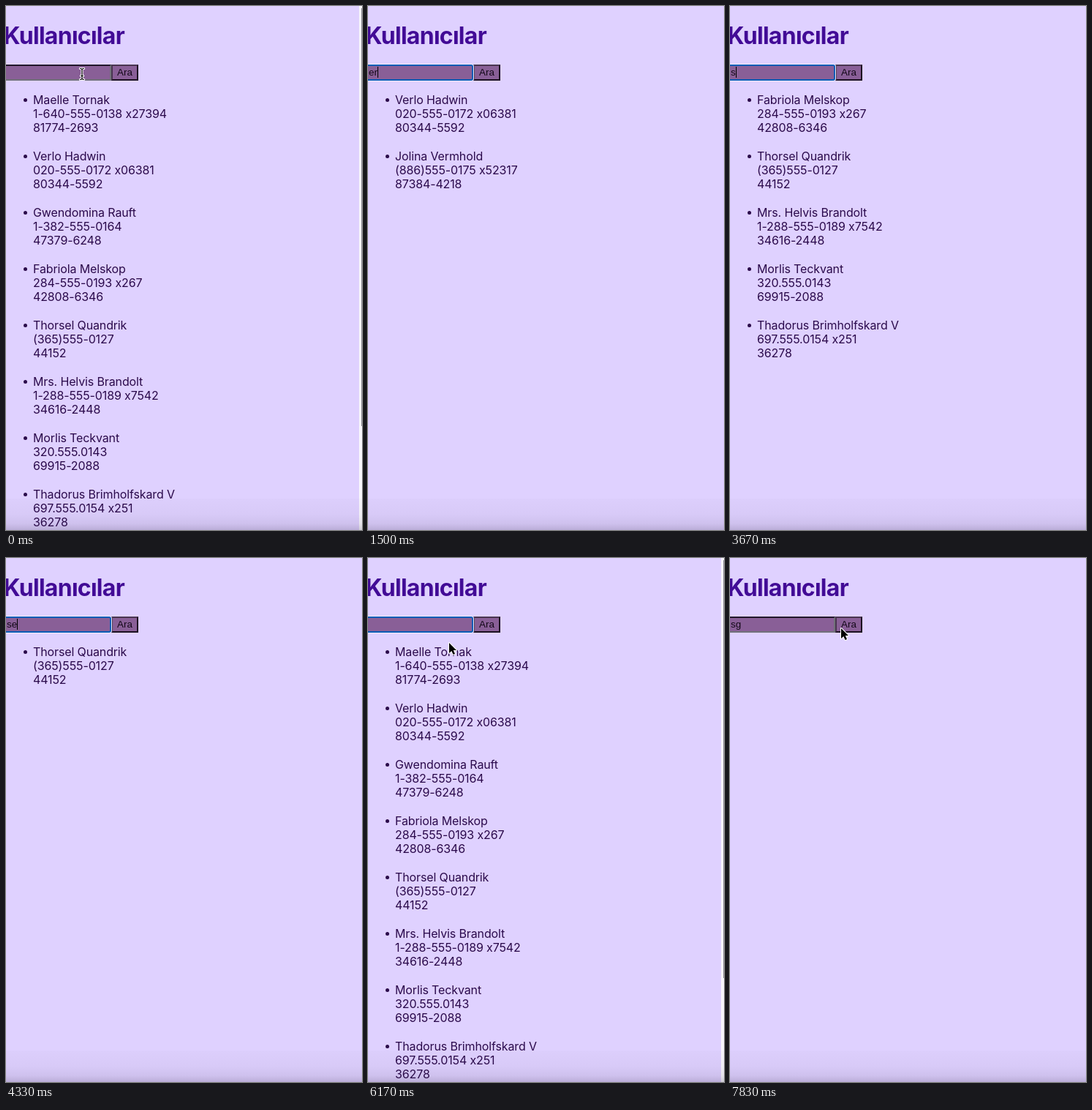
Recreate the animation shown at these times as an HTML page. Size 487 px wide and 716 px high, loop 8 s.

```html
<!DOCTYPE html>
<html lang="tr">
<head>
<meta charset="utf-8">
<title>Kullanıcılar</title>
<style>
  html, body { margin: 0; width: 100%; height: 100%; overflow: hidden; background: #dfd1ff; }
  body { position: relative; color: #2b0a4b; font: 16px/19.25px Inter, sans-serif; letter-spacing: -.008em; font-optical-sizing: none; }
  body > * { position: absolute; box-sizing: border-box; }
  h1 { left: -3.4px; top: 22px; margin: 0; color: #420b96; font-size: 32px; line-height: 38px; font-weight: 700; letter-spacing: -.023em; white-space: nowrap; }
  #field, #button { top: 80px; height: 22px; background: #895f97; color: #130818; font: 13.4px/18px "Liberation Sans", Arial, sans-serif; letter-spacing: 0; white-space: pre; }
  #field { left: -4px; width: 148px; padding-left: 3px; border: 2px solid; border-color: #21172a #71717a #71717a #21172a; }
  #field.focus { z-index: 1; border-color: #0b5cb6; border-radius: 3px; box-shadow: 0 0 0 1px #f1eaff; }
  #caret { display: inline-block; width: 1px; height: 15px; background: #000; vertical-align: middle; margin-top: -2px; }
  #button { left: 144px; width: 37px; text-align: center; border: 2px solid; border-color: #493650 #1c1121 #1c1121 #493650; }
  ul { left: 37px; top: 118.5px; margin: 0; padding: 0; list-style: none; white-space: pre; }
  li { position: relative; height: 77px; }
  li::before { content: ""; position: absolute; left: -13.5px; top: 7.1px; width: 5px; height: 5px; border-radius: 50%; background: #2b0a4b; }
  #track { right: 0; top: 0; width: 4px; height: 100%; background: #f8f6fc; }
  #thumb { position: absolute; right: 0; top: 3px; width: 1px; background: #8f8d96; }
  #shade { left: 0; right: 0; top: 673px; bottom: 0; background: linear-gradient(rgba(40,30,60,.015), rgba(40,30,60,.04) 50%, rgba(40,30,60,.09) 80%, rgba(40,30,60,.2)); }
  #pointer { left: 0; top: 0; width: 1px; height: 1px; overflow: visible; z-index: 2; }
  #pointer path { paint-order: stroke; stroke: #fff; stroke-width: 2; stroke-linejoin: round; }
</style>
</head>
<body>
<h1>Kullanıcılar</h1>
<div id="field"><span id="query"></span><span id="caret"></span></div>
<div id="button">Ara</div>
<ul id="list"></ul>
<div id="track"><div id="thumb"></div></div>
<div id="shade"></div>
<svg id="pointer">
  <path id="arrow" d="M0 0V14L3.3 11L5.6 16L8 15L5.8 10H10Z"/>
  <path id="beam" d="M-3-8H-1L0-7L1-8H3V-7H1.4L.6-6V2H2V3H.6V6L1.4 7H3V8H1L0 7L-1 8H-3V7H-1.4L-.6 6V3H-2V2H-.6V-6L-1.4-7H-3Z"/>
</svg>
<script>
const LOOP = 8000;
const el = id => document.getElementById(id);

const users = [
  ["Maelle Tornak", "1-640-555-0138 x27394", "81774-2693"],
  ["Verlo Hadwin", "020-555-0172 x06381", "80344-5592"],
  ["Gwendomina Rauft", "1-382-555-0164", "47379-6248"],
  ["Fabriola Melskop", "284-555-0193 x267", "42808-6346"],
  ["Thorsel Quandrik", "(365)555-0127", "44152"],
  ["Mrs. Helvis Brandolt", "1-288-555-0189 x7542", "34616-2448"],
  ["Morlis Teckvant", "320.555.0143", "69915-2088"],
  ["Thadorus Brimholfskard V", "697.555.0154 x251", "36278"],
  ["Jolina Vermhold", "(886)555-0175 x52317", "87384-4218"]
];

const typing = [
  [0, ""], [1000, "e"], [1330, "er"], [2500, "e"], [3160, ""], [3660, "s"],
  [4000, "se"], [5000, "s"], [5330, ""], [6330, "s"], [6660, "sg"]
];

// time, x, y, pointer shape
const moves = [
  [0, 104, 93, "beam"], [1000, 104, 93, ""], [2500, 104, 93, "beam"],
  [2660, 104, 118, "beam"], [2830, 104, 133, "beam"], [3160, 104, 133, ""],
  [5660, 106, 112, "arrow"], [6160, 111, 116, "arrow"], [6330, 111, 116, ""],
  [6660, 128, 108, "arrow"], [6830, 134, 105, "arrow"], [7000, 134, 105, "arrow"],
  [7330, 58, 52, "arrow"], [7660, 164, 90, "arrow"], [7830, 152, 96, "arrow"]
];

const lastIndex = (keys, t) => keys.findLastIndex(key => key[0] <= t);

function showUsers(query) {
  const found = users.filter(user => user[0].toLowerCase().includes(query));
  el("list").replaceChildren(...found.map(user => {
    const item = document.createElement("li");
    item.textContent = user.join("\n");
    return item;
  }));
  el("query").textContent = query;
  el("track").hidden = found.length < 8;
  el("thumb").style.height = (query ? 627 : 571) + "px";
}

function movePointer(t) {
  const i = lastIndex(moves, t);
  const [start, x, y, shape] = moves[i];
  const [end, nextX, nextY] = moves[i + 1] || [LOOP, x, y];
  const p = (t - start) / (end - start);
  el("pointer").style.transform = `translate(${x + (nextX - x) * p}px, ${y + (nextY - y) * p}px)`;
  for (const id of ["arrow", "beam"]) el(id).style.display = id === shape ? "" : "none";
}

let shown = null;
function render(now) {
  const t = now % LOOP;
  const [since, query] = typing[lastIndex(typing, t)];
  if (query !== shown) showUsers(shown = query);
  const focused = t >= 500 && t < 7000;
  el("field").className = focused ? "focus" : "";
  const caretOn = focused && query && (t - since) % 1000 < 500;
  el("caret").style.visibility = caretOn ? "visible" : "hidden";
  movePointer(t);
  requestAnimationFrame(render);
}
render(0);
</script>
</body>
</html>
```
